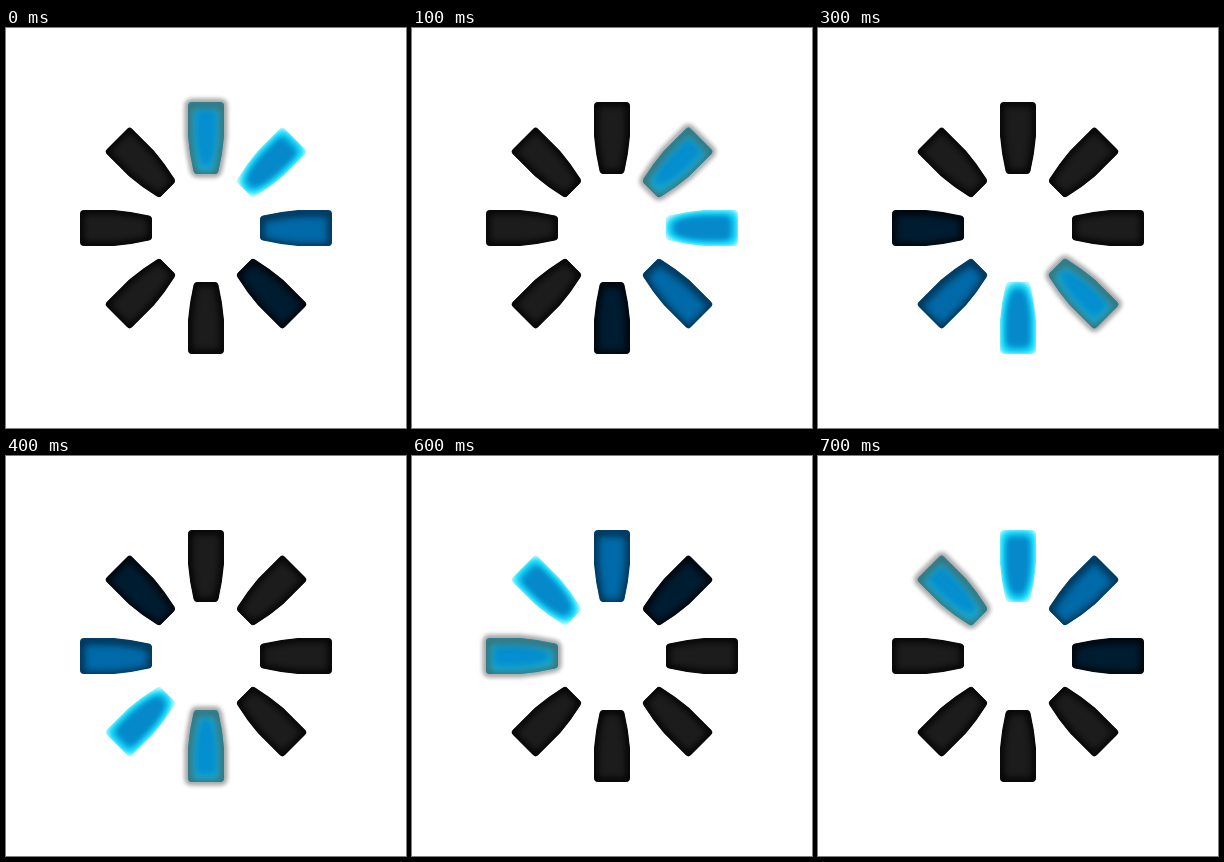
Write an HTML page that moves like this. It is 400 px wide and 400 px high and loops after 0.8 s.

```html
<!DOCTYPE html>
<html lang="en">
<head>
<meta charset="utf-8">
<title>Spinner</title>
<style>
html, body { margin: 0; width: 100%; height: 100%; overflow: hidden; background: #fff; }
svg { display: block; width: 100%; height: 100%; }
</style>
</head>
<body>
<svg viewBox="-200 -200 400 400">
  <defs>
    <path id="blade" d="M-14-126H14Q18-126 18-122V-92Q16.5-74 12.5-57Q11.5-54 9-54H-9Q-11.5-54-12.5-57Q-16.5-74-18-92V-122Q-18-126-14-126Z"/>
    <path id="core" d="M-8-126H8Q18-126 18-116V-94Q17-74 12-62Q9-54 0-54Q-9-54-12-62Q-17-74-18-94V-116Q-18-126-8-126Z"/>
    <clipPath id="inside"><use href="#blade"/></clipPath>
    <filter id="soft" x="-.5" y="-.5" width="2" height="2" color-interpolation-filters="sRGB"><feGaussianBlur stdDeviation="3.5"/></filter>
    <filter id="fine" x="-.5" y="-.5" width="2" height="2" color-interpolation-filters="sRGB"><feGaussianBlur stdDeviation="2"/></filter>
  </defs>
  <g id="wheel"></g>
</svg>
<script>
const COUNT = 8, STEP = 100;

const rim = (color, width, filter, opacity = 1, shape = 'blade') =>
  `<use href="#${shape}" fill="none" stroke="${color}" stroke-width="${width}" filter="url(#${filter})" opacity="${opacity}"/>`;
const body = (fill, rims) =>
  `<g clip-path="url(#inside)"><use href="#blade" fill="${fill}"/>${rims}</g>`;
// Moves a shade straight down the screen, whatever way the blade points
const drop = (angle, y, shade) =>
  `<g transform="rotate(${-angle}) translate(0 ${y}) rotate(${angle})">${shade}</g>`;

// Looks ordered by distance ahead of the leading blade
const idle = () => body('#1c1c1c', rim('#000', 7, 'soft'));
const looks = [
  a => rim('#000', 7, 'fine', .35) + body('#058fd0',
    rim('#1cb8d8', 14, 'soft', .9, 'core') + drop(a, 2, rim('#40686a', 9, 'soft', .9))),
  () => body('#c4f9ff',
    '<use href="#core" fill="#14e2ff" filter="url(#fine)"/>' +
    '<g clip-path="url(#inside)"><use href="#core" fill="#0589cb" transform="translate(0 -91) scale(.72 .84) translate(0 91)" filter="url(#soft)"/></g>'),
  a => body('#006aa8', drop(a, 2, rim('#002c4a', 9, 'soft', .9))),
  a => body('#001c31', drop(a, 1, rim('#000', 7, 'soft'))),
];

const wheel = document.getElementById('wheel');
let shown = -1;

function draw(now) {
  const lead = Math.floor(now / STEP) % COUNT;
  if (lead === shown) return;
  shown = lead;
  wheel.innerHTML = Array.from({ length: COUNT }, (_, i) => {
    const angle = i * 360 / COUNT;
    const look = looks[(i - lead + COUNT) % COUNT] || idle;
    return `<g transform="rotate(${angle})">${look(angle)}</g>`;
  }).join('');
}

let start;
function tick(now) {
  start ??= now;
  draw(now - start);
  requestAnimationFrame(tick);
}
draw(0);
requestAnimationFrame(tick);
</script>
</body>
</html>
```
